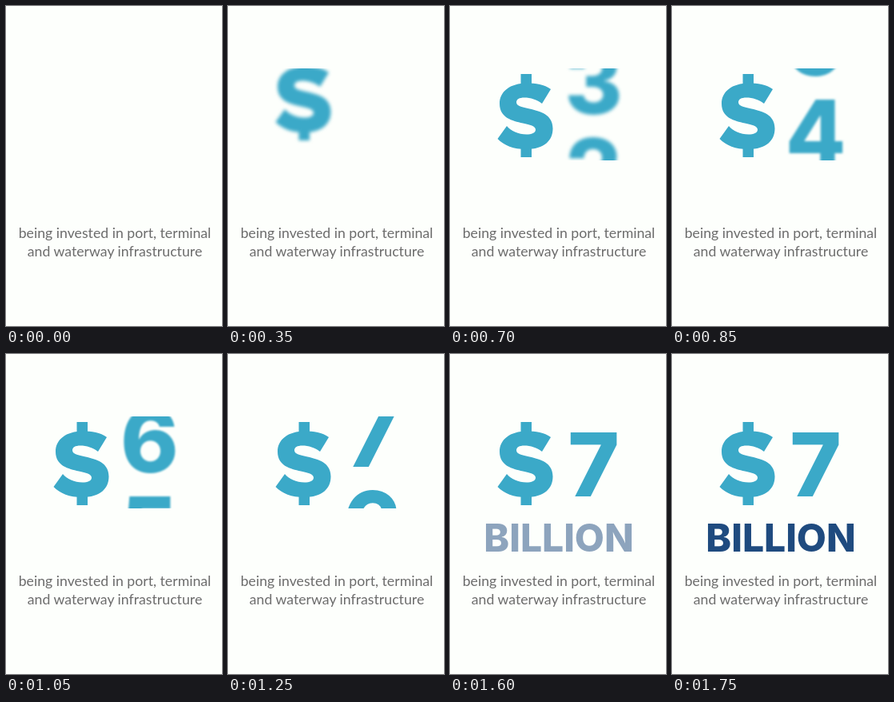
These frames come from a looping animation (270 px wide and 400 px high, 1800 ms). An HTML page:

```html
<!DOCTYPE html>
<html lang="en">
<head>
<meta charset="utf-8">
<style>
  html, body { margin: 0; height: 100%; overflow: hidden; background: #fdfffc; }
  svg { display: block; width: 270px; height: 400px; }
  text { text-anchor: middle; font-family: Inter, sans-serif; font-weight: 800; }
  .big { font-size: 110px; fill: #3ba9c8; }
  #unit { font-size: 48px; fill: #1f4b7f; }
  .caption { font: 400 17.7px Lato, sans-serif; fill: #6c6c6c; }
</style>
</head>
<body>
<svg viewBox="0 0 270 400">
  <clipPath id="window"><rect y="78" width="270" height="115"/></clipPath>
  <g class="big" clip-path="url(#window)">
    <g id="dollar" role="img" aria-label="$">
      <path d="M126 104C118 98 107 96.5 96 96.5C75 96.5 62 107 62 122
        C62 140 78 143.5 91 146.5C100 148.5 107 150 107 154.5
        C107 158.5 102 160.5 95.5 160.5C85.5 160.5 76 156 71 150L59.5 166
        C67.5 174.5 79.5 179 95 179C118 179 128.5 168 128.5 153
        C128.5 135.5 112.5 131.5 99.5 128.5C90.5 126.5 83 125.2 83 120.5
        C83 116.5 86.5 114.5 93 114.5C100.5 114.5 109 117 115 122Z"/>
      <path d="M88.5 85h13.5v14h-13.5zM88.5 176h13.5v13h-13.5z"/>
    </g>
    <g id="reel"></g>
  </g>
  <text id="unit" x="136" y="247">BILLION</text>
  <text class="caption" x="136" y="289.5">being invested in port, terminal</text>
  <text class="caption" x="136" y="312.5">and waterway infrastructure</text>
</svg>
<script>
const LOOP = 1800, STEP = 50, PITCH = 110, DIGITS = 7, BASELINE = 178;
const [dollar, reel, unit] = ['dollar', 'reel', 'unit'].map(id => document.getElementById(id));

// Digits are stacked upwards, so that lowering the reel counts up.
for (let i = 0; i < DIGITS; i++) {
  reel.innerHTML += `<text x="179.5" y="${BASELINE - i * PITCH}">${i + 1}</text>`;
}

const progress = (t, start, end) => Math.min(1, Math.max(0, (t - start) / (end - start)));

// Drops a group into place with a quadratic ease-out while its blur fades.
function roll(group, left, from, to, blur) {
  group.setAttribute('transform', `translate(0 ${to + (from - to) * left * left})`);
  group.style.filter = left > 0 ? `blur(${blur * left}px)` : 'none';
  group.style.visibility = left < 1 ? 'visible' : 'hidden';
}

function draw() {
  const t = Math.floor(performance.now() % LOOP / STEP) * STEP;
  roll(dollar, 1 - progress(t, 157, 500), -PITCH, 0, 5);
  roll(reel, 1 - progress(t, 500, 1460), -PITCH, (DIGITS - 1) * PITCH, 2.4);
  unit.style.opacity = progress(t, 1450, 1750);
  requestAnimationFrame(draw);
}
draw();
</script>
</body>
</html>
```
